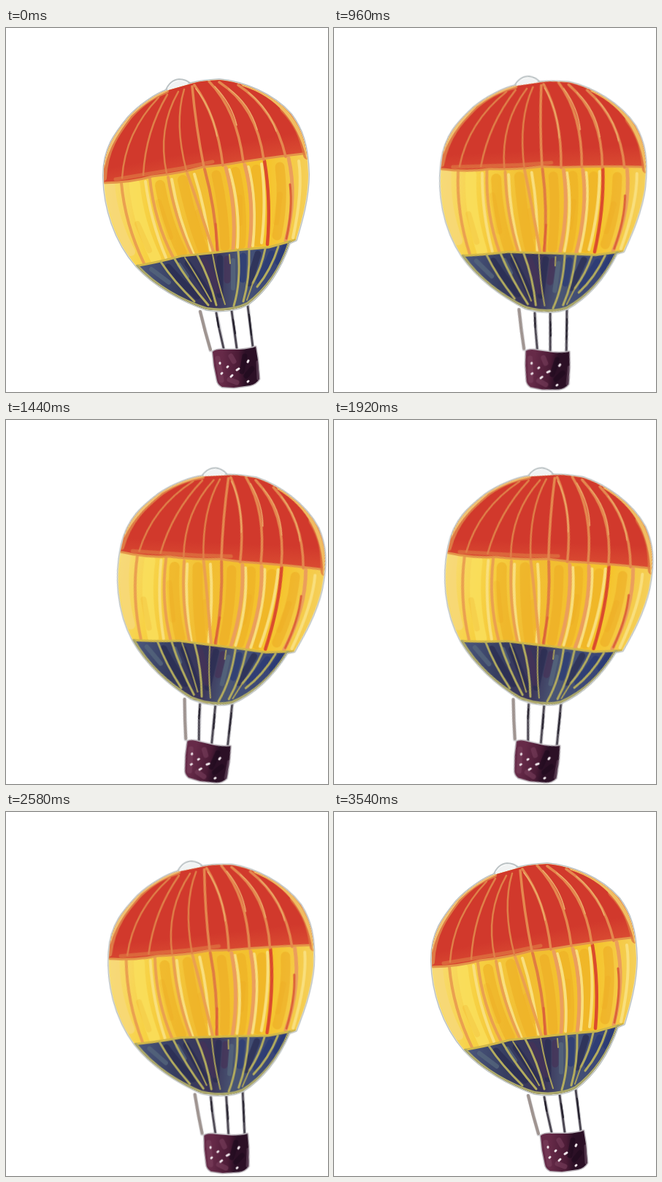
Recreate the animation shown at these times as an HTML page. Size 441 by 498 pixels, loop 3.6 s.

```html
<!DOCTYPE html>
<html lang="en">
<head>
<meta charset="utf-8">
<title>Hot-air balloon</title>
<style>
  html, body { margin: 0; width: 100%; height: 100%; overflow: hidden; background: #fff; }
  svg { display: block; width: 441px; height: 498px; fill: none; stroke-linecap: round; stroke-linejoin: round; }
  .balloon { transform-origin: 281px 293px; animation: sway 3.6s infinite; }
  @keyframes sway {
    0%, 3.3% { transform: rotate(0deg); animation-timing-function: cubic-bezier(.45, 0, .6, 1); }
    45.6% { transform: rotate(13.8deg); animation-timing-function: cubic-bezier(.33, 0, .5, 1); }
    93.3%, 100% { transform: rotate(0deg); }
  }
</style>
</head>
<body>
<svg viewBox="0 0 441 498">
  <defs>
    <path id="shape" d="M219 86C205 91 183 106 168 122C150 144 133 165 134 205C135 245 148 290 179 326C204 353 240 373 275 385C295 388 315 386 331 378C352 362 374 335 388 294L397 290C403 270 414 235 414 200C413 160 405 138 390 118C365 90 325 74 292 71C275 72 265 73 254 76Z"/>
    <path id="crate" d="M283 443Q288 439 299 440L320 440Q334 439 342 436L345 455L347 480Q343 487 334 489L312 492L296 491Q290 488 289 482L285 462Z"/>
    <clipPath id="inside"><use href="#shape"/></clipPath>
    <clipPath id="weave"><use href="#crate"/></clipPath>
    <linearGradient id="red" gradientUnits="userSpaceOnUse" x1="262" y1="70" x2="285" y2="192">
      <stop offset=".78" stop-color="#d1392c"/>
      <stop offset="1" stop-color="#d94a31"/>
    </linearGradient>
    <linearGradient id="yellow" gradientUnits="userSpaceOnUse" x1="136" y1="0" x2="414" y2="0">
      <stop offset="0" stop-color="#f8dc74"/>
      <stop offset=".2" stop-color="#f7d143"/>
      <stop offset=".45" stop-color="#f1bd32"/>
      <stop offset=".8" stop-color="#f5c42c"/>
      <stop offset="1" stop-color="#f5cf58"/>
    </linearGradient>
    <linearGradient id="blue" gradientUnits="userSpaceOnUse" x1="185" y1="0" x2="388" y2="0">
      <stop offset="0" stop-color="#4a567c"/>
      <stop offset=".25" stop-color="#363d60"/>
      <stop offset=".5" stop-color="#3a3459"/>
      <stop offset=".65" stop-color="#4a5674"/>
      <stop offset="1" stop-color="#333f78"/>
    </linearGradient>
    <linearGradient id="plum">
      <stop offset=".2" stop-color="#662a48"/>
      <stop offset=".55" stop-color="#4b1b36"/>
      <stop offset=".7" stop-color="#2c1026"/>
    </linearGradient>
  </defs>

  <g class="balloon">
    <!-- ropes -->
    <path stroke="#d3d3d6" stroke-width="5" d="M266 388L280 441M288 389L298 439M309 386L316 438M331 378L338 436"/>
    <path stroke="#9f9490" stroke-width="4" d="M266 388Q270 404 273 416L280 440"/>
    <path stroke="#4a4550" stroke-width="2.8" d="M288 390L292 412L298 438M309 387L316 438M331 380L338 436"/>
    <path stroke="#24202c" stroke-width="2" d="M289 396L291 409M311 399L314 418M333 392L336 420"/>

    <!-- basket -->
    <use href="#crate" stroke="#bbb5bb" stroke-width="3"/>
    <use href="#crate" fill="url(#plum)"/>
    <g clip-path="url(#weave)">
      <path stroke="#7c4260" stroke-width="7" opacity=".55" d="M290 452L295 482M308 449L312 456M306 481L316 485"/>
      <path stroke="#200b1e" stroke-width="7" opacity=".7" d="M327 449L323 470M337 466L329 476"/>
      <path stroke="#6d5067" stroke-width="5" opacity=".6" d="M345 457L346 480"/>
      <path stroke="#eee5ea" stroke-width="3" d="M303 464L304 463M316 468L319 466M331 457L332 455M295 473L296 472M308 477L310 475M331 484L332 483M293 459V458"/>
    </g>

    <!-- envelope -->
    <path fill="#fff" stroke="#bcc3c5" stroke-width="2" d="M218 87Q224 71 237 70Q247 70 254 77"/>
    <use href="#shape" stroke="#b9c0c2" stroke-width="4"/>
    <use href="#shape" stroke="#e4e2d4" stroke-width="1.5"/>
    <path fill="#f1f3f3" d="M220 86Q226 73 237 72Q246 72 252 78Z"/>
    <g clip-path="url(#inside)">
      <path fill="url(#yellow)" d="M120 60H430V400H120Z"/>

      <!-- yellow panels -->
      <path stroke="#fae05d" stroke-width="15" opacity=".8" d="M176 214Q181 266 205 316"/>
      <path stroke="#f8d97a" stroke-width="12" opacity=".8" d="M143 215Q147 262 171 306"/>
      <path stroke="#eeb125" stroke-width="14" opacity=".65" d="M211 215Q220 266 241 308M242 208Q254 264 270 304M314 197Q325 246 321 296M343 194Q350 245 345 292"/>
      <path stroke="#edaa23" stroke-width="13" opacity=".55" d="M288 201Q299 249 300 299M375 190Q381 237 371 284"/>
      <path stroke="#e8a11f" stroke-width="8" opacity=".2" d="M180 268L196 304M209 238L225 286M263 252L275 286M320 232V267M375 228L370 266"/>
      <path stroke="#f9df7d" stroke-width="4" d="M191 210Q198 264 219 314M227 207Q236 262 258 312M258 200Q273 247 280 304M306 194Q321 244 317 300M332 190Q344 237 338 298M350 186Q357 238 350 294M401 182Q407 222 393 287"/>
      <path stroke="#eaa050" stroke-width="4" d="M158 212Q163 268 189 322M197 206Q203 264 229 314M222 204Q231 260 255 311M248 198Q266 249 284 306"/>
      <path stroke="#eb9e5c" stroke-width="5" d="M301 191Q316 245 311 303M327 187Q341 239 333 302M387 178Q399 230 383 291"/>
      <path stroke="#e07c42" stroke-width="4" d="M272 193Q286 244 290 305"/>
      <path stroke="#db4b2d" stroke-width="4.5" d="M354 182Q363 236 358 296"/>
      <path stroke="#dc6338" stroke-width="3" d="M389 214Q393 247 384 288M287 268L289 304"/>

      <!-- red cap -->
      <path fill="url(#red)" stroke="#e39449" stroke-width="3" d="M120 60H430V169L407 172Q352 178 300 187L270 190Q237 199 200 203Q170 212 130 212Z"/>
      <path stroke="#e28b4c" stroke-width="8" opacity=".8" d="M134 205C136 163 155 140 170 120C190 98 206 91 219 86"/>
      <path stroke="#f0c574" stroke-width="4" d="M133 190C140 158 158 135 170 119C191 99 206 91 220 85"/>
      <path stroke="#e0793f" stroke-width="12" opacity=".8" d="M381 110C400 129 407 147 413 174"/>
      <path stroke="#f0bd62" stroke-width="5" d="M325 77C366 90 400 120 414 178"/>
      <path stroke="#e18a49" stroke-width="5" opacity=".5" d="M150 207L198 199L240 192L283 183"/>
      <path stroke="#df8048" stroke-width="2.5" d="M209 95Q163 143 159 205M221 91Q191 142 188 201M236 87Q207 138 220 199M244 84Q230 130 247 195"/>
      <path stroke="#e4884e" stroke-width="3.5" d="M255 80Q260 135 271 190M258 78Q289 120 297 188M278 73Q316 112 325 183M292 74Q343 107 353 180M318 78Q368 111 383 176"/>
      <path stroke="#edae6b" stroke-width="1.5" d="M260 83Q282 111 289 148M286 80Q309 104 316 133M305 83Q334 104 344 139M332 88Q360 111 370 141"/>

      <!-- blue base -->
      <path fill="url(#blue)" stroke="#d2b848" stroke-width="3" d="M170 327Q207 321 240 312L280 308Q322 303 360 300L396 290V400H170Z"/>
      <path stroke="#282b50" stroke-width="9" opacity=".7" d="M222 327Q242 350 262 367M249 322Q266 346 280 368M293 315V365M345 309L333 349"/>
      <path stroke="#473258" stroke-width="9" opacity=".7" d="M271 319Q281 335 291 359M303 316V345"/>
      <path stroke="#273875" stroke-width="9" opacity=".65" d="M325 312L324 344M364 309L347 346M382 301L373 320"/>
      <path stroke="#56677c" stroke-width="6" opacity=".75" d="M199 330L223 348M311 318V356M237 324L248 340"/>
      <path stroke="#aba869" stroke-width="6" d="M180 327C205 354 240 374 275 385C295 388 315 386 331 378C354 361 376 334 389 294"/>
      <path stroke="#b3ac5e" stroke-width="3" d="M212 320Q230 347 258 374M231 316Q250 348 277 379M262 311Q279 342 288 379M318 305Q322 347 312 380M333 304Q334 343 325 374M355 302Q350 327 338 349M373 299Q363 331 344 354"/>
      <path stroke="#a9a05a" stroke-width="2" d="M245 314Q262 340 281 374M283 310Q289 345 300 378M338 349L330 372M306 310L307 322"/>
    </g>
  </g>
</svg>
</body>
</html>
```
